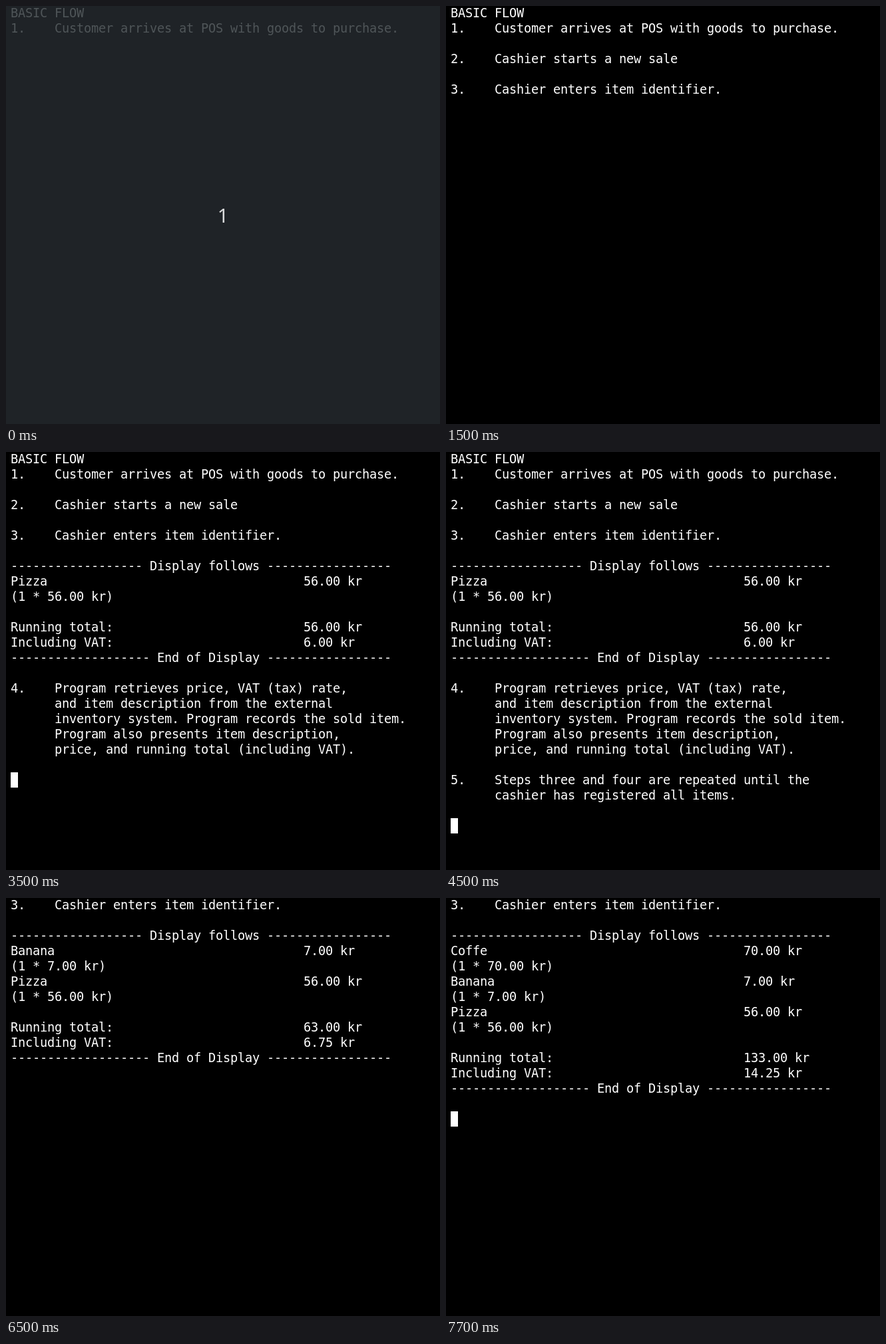
Write an HTML page that moves like this. It is 652 px wide and 629 px high and loops after 8000 ms.

```html
<!DOCTYPE html>
<html lang="en">
<head>
<meta charset="utf-8">
<title>Point of sale terminal</title>
<style>
  html, body { margin: 0; width: 100%; height: 100%; overflow: hidden; background: #000; }
  #stage { position: relative; width: 652px; height: 629px; overflow: hidden; background: #000; }
  #screen {
    position: absolute; left: 7px; top: -1px; margin: 0; color: #fff;
    font: 14pt/23px "DejaVu Sans Mono", monospace;
    letter-spacing: calc(11px - 1ch); /* terminal cell grid */
    font-variant-ligatures: none;
  }
  #cursor { position: absolute; left: 7px; width: 11px; height: 23px; background: #fff; }
  #count {
    position: absolute; left: 0; top: 0; width: 652px; line-height: 629px;
    text-align: center; color: #d9dadb; font-family: "Noto Sans", sans-serif; font-size: 29px;
  }
  #stage.dim { background: #1f2327; }
  .dim #screen { color: #4f5558; }
</style>
</head>
<body>
<div id="stage">
  <pre id="screen"></pre>
  <div id="cursor"></div>
  <div id="count">1</div>
</div>
<script>
const LOOP = 8000, ROW = 23;
const [stage, output, cursor, count] =
  ["stage", "screen", "cursor", "count"].map(id => document.getElementById(id));

const step = (n, ...lines) => lines.map((s, i) => (i ? "" : n + ".").padEnd(6) + s);
const money = v => v.toFixed(2) + " kr";
const pair = (label, v) => label.padEnd(40) + money(v);
const rule = (n, label) => "-".repeat(n) + ` ${label} ` + "-".repeat(17);

// Receipt block: newest item first, then the totals.
const receipt = (items, vat) => [
  "",
  rule(18, "Display follows"),
  ...items.flatMap(([name, price]) => [pair(name, price), `(1 * ${money(price)})`]),
  "",
  pair("Running total:", items.reduce((sum, item) => sum + item[1], 0)),
  pair("Including VAT:", vat),
  rule(19, "End of Display")
];

const pizza = ["Pizza", 56], banana = ["Banana", 7], coffee = ["Coffe", 70];
const enter = step(3, "Cashier enters item identifier.");

const intro = ["BASIC FLOW", ...step(1, "Customer arrives at POS with goods to purchase.")];
const started = [...intro, "", ...step(2, "Cashier starts a new sale")];
const asked = [...started, "", ...enter];
const scanned = [...asked, ...receipt([pizza], 6)];
const recorded = [...scanned, "", ...step(4,
  "Program retrieves price, VAT (tax) rate,",
  "and item description from the external",
  "inventory system. Program records the sold item.",
  "Program also presents item description,",
  "price, and running total (including VAT).")];
const repeated = [...recorded, "", ...step(5,
  "Steps three and four are repeated until the",
  "cashier has registered all items.")];
const second = [...enter, ...receipt([banana, pizza], 6.75)];
const third = [...enter, ...receipt([coffee, banana, pizza], 14.25)];

// [start ms, lines]
const pages = [
  [0, intro], [500, started], [1500, asked], [2400, scanned],
  [3500, recorded], [4500, repeated], [6500, second], [7500, third]
].map(([t, lines]) => [t, lines.join("\n")]);

// [on ms, off ms, row]
const blinks = [
  [600, 1100, 5], [1700, 2300, 6], [3000, 3500, 15], [3500, 3600, 21],
  [4100, 4500, 21], [4500, 4700, 24], [5300, 6000, 24], [6600, 7100, 12],
  [7700, LOOP, 14]
];

let shown = "";

function draw(t) {
  const text = pages.filter(p => p[0] <= t).pop()[1];
  if (text !== shown) output.textContent = shown = text;

  const blink = blinks.find(([on, off]) => t >= on && t < off);
  cursor.hidden = !blink;
  if (blink) cursor.style.top = blink[2] * ROW - 1 + "px";

  const counting = t < 100;
  count.hidden = !counting;
  stage.classList.toggle("dim", counting);
}

const start = performance.now();
function tick() {
  draw((performance.now() - start) % LOOP);
  requestAnimationFrame(tick);
}
draw(0);
requestAnimationFrame(tick);
</script>
</body>
</html>
```
